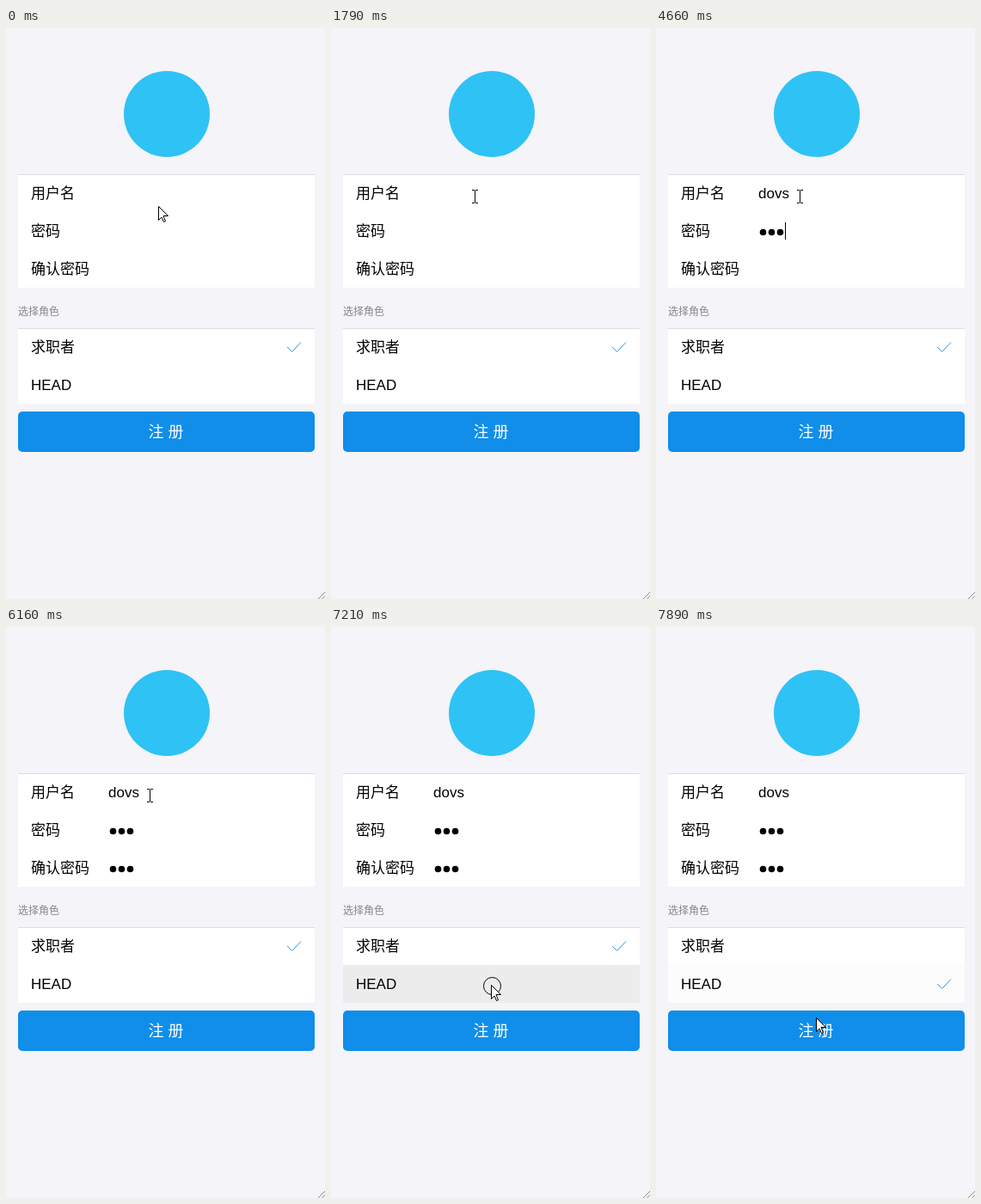
An HTML page for the animation above (8 s loop, 371 px wide and 664 px high).

```html
<!DOCTYPE html>
<html lang="zh-CN">
<head>
<meta charset="utf-8">
<style>
html, body { margin: 0; width: 100%; height: 100%; overflow: hidden; background: #f4f4f9; }
svg { display: block; width: 371px; height: 664px; }
text { font: 17px "Liberation Sans", "Noto Sans CJK SC", "Noto Sans CJK", sans-serif; white-space: pre; }
</style>
</head>
<body>
<svg viewBox="0 0 371 664">
  <circle cx="187" cy="100" r="50" fill="#2fc2f5"/>
  <path d="M14 171h345v131H14zM14 350h345v87H14z" fill="#fff"/>
  <path d="M14 170.5h345M14 349.5h345" stroke="#ddd"/>
  <rect id="role" x="14" y="393" width="345" height="44"/>
  <text x="29" y="198">用户名</text>
  <text x="29" y="242">密码</text>
  <text x="29" y="286">确认密码</text>
  <text x="14" y="334" fill="#888" style="font-size:12px">选择角色</text>
  <text x="29" y="377">求职者</text>
  <text x="29" y="421">HEAD</text>
  <text id="user" x="119" y="198"></text>
  <g id="pass"></g>
  <rect id="caret" width="1" height="20"/>
  <path id="check" d="M327 371l5.7 5.5 10.3-11" fill="none" stroke="#2a97ea"/>
  <rect x="14" y="446" width="345" height="47" rx="5" fill="#108ee9"/>
  <text x="186" y="476" fill="#fff" text-anchor="middle" style="font-size:18px">注 册</text>
  <path d="M362.5 664.5l9-9M367 664.5l4.5-4.5" stroke="#888"/>
  <g id="pointer" fill="none" stroke="#000">
    <circle id="ring" cx="1.5" cy="1.5" r="10"/>
    <path id="arrow" d="M.5 .5v16l3.5-3.5 2.5 5.5 2-.8-2.5-6.2h5.5z" fill="#fff"/>
    <path id="beam" d="M-3 -7.5h3M1 -7.5h3M.5 -7v14M-3 7.5h3M1 7.5h3"/>
  </g>
</svg>
<script>
const el = id => document.getElementById(id);
const show = (id, on) => el(id).setAttribute('visibility', on ? 'visible' : 'hidden');
const move = (id, x, y) => el(id).setAttribute('transform', `translate(${x} ${y})`);
const within = (t, a, b) => t >= a && t < b;
const count = (t, times) => times.filter(s => t >= s).length;

const name = 'dovs';
const nameTimes = [2490, 2650, 2860, 3100];
const dotTimes = [[4550, 4600, 4660], [5550, 5620, 5690]];
const nameCaret = [119, 128, 138, 146, 155];
// intervals with the caret lit, with the row it stands in
const caretOn = [[950, 1290, 0], [1350, 1790, 0], [2310, 3350, 0], [3820, 4340, 1],
  [4550, 4850, 1], [5090, 6160, 2]];
const path = [[0, 177, 207], [60, 175, 203], [120, 172, 197], [180, 169, 189], [240, 169, 183],
  [300, 172, 181], [360, 175, 182], [410, 176, 183], [750, 172, 190], [820, 167, 196],
  [6310, 163, 190], [6360, 170, 186]];

function pointerAt(t) {
  // later moves advance in 60 ms steps
  const ease = (start, steps) => {
    const p = Math.min(1, (Math.floor((t - start) / 60) + 1) / steps);
    return p * p * (3 - 2 * p);
  };
  if (t >= 7650) return [186, Math.round(416 + 38 * ease(7650, 5))];
  if (t >= 6510) {
    const e = ease(6510, 10);
    return [Math.round(170 + 16 * e), Math.round(186 + 230 * e)];
  }
  return path.filter(p => t >= p[0]).pop().slice(1);
}

const dots = dotTimes.map((times, row) => times.map((_, i) => {
  const c = document.createElementNS('http://www.w3.org/2000/svg', 'circle');
  c.setAttribute('cx', 124.5 + 10 * i);
  c.setAttribute('cy', 237.5 + 44 * row);
  c.setAttribute('r', 3.8);
  return el('pass').appendChild(c);
}));

function draw(t) {
  const letters = count(t, nameTimes);
  const typed = dotTimes.map(times => count(t, times));
  el('user').textContent = name.slice(0, letters);
  dots.forEach((row, r) => row.forEach((c, i) =>
    c.setAttribute('visibility', i < typed[r] ? 'visible' : 'hidden')));

  const lit = caretOn.find(([a, b]) => within(t, a, b));
  show('caret', lit);
  if (lit) {
    const row = lit[2];
    move('caret', row ? [119, 130, 140, 150][typed[row - 1]] : nameCaret[letters], 182 + 44 * row);
  }

  el('role').setAttribute('fill', within(t, 7210, 7330) ? '#ececec' : t >= 7330 ? '#fcfcfc' : '#fff');
  move('check', 0, t >= 7530 ? 44 : 0);

  const [x, y] = pointerAt(t);
  const beam = [193, 237, 281].some(c => Math.abs(y - c) < 13);
  move('pointer', x, y);
  show('beam', beam);
  show('arrow', !beam);
  show('ring', within(t, 890, 1050) || within(t, 7110, 7270));
}

let start;
function tick(now) {
  start ??= now;
  draw((now - start) % 8000);
  requestAnimationFrame(tick);
}
draw(0);
requestAnimationFrame(tick);
</script>
</body>
</html>
```
